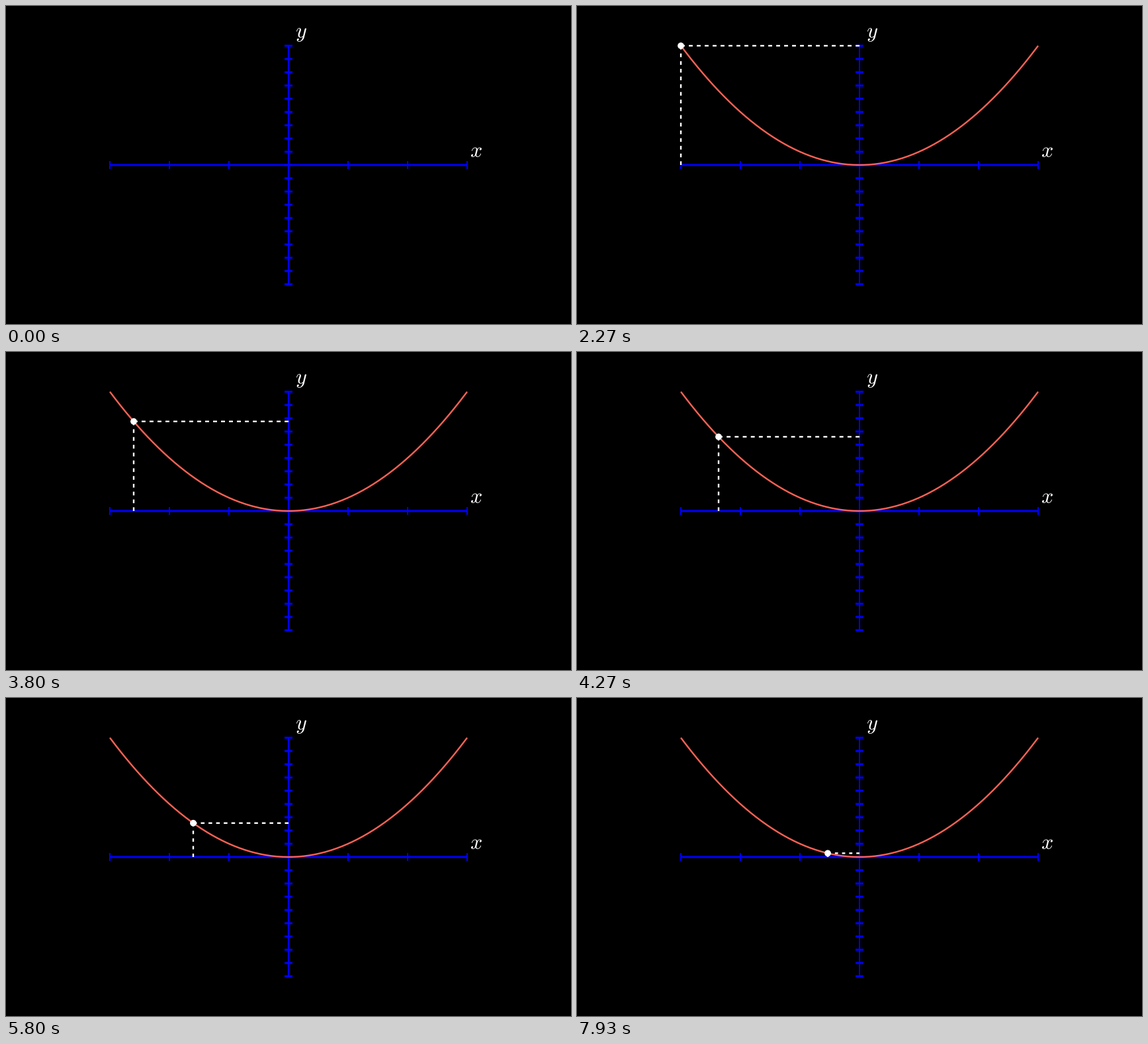
Write a matplotlib script that moves like this. It is 854 px wide and 480 px high and loops after 8000 ms.

```python
import math

import matplotlib.pyplot as plt
import numpy as np
from matplotlib.animation import FuncAnimation
from matplotlib.collections import LineCollection
from matplotlib.patches import Circle, PathPatch
from matplotlib.textpath import TextPath
from matplotlib.transforms import Affine2D

W, H, DPI = 854, 480, 64
FRAMES, TICK_MS = 400, 20
STEP_MS = 1000 / 15        # the motion advances 15 times per second
LEAD_MS = 14               # rounds a step's start to the nearest drawn frame
OX, OY = 427, 240          # origin in pixels
UX, UY = 90, 20            # pixels per unit on each axis
BLUE, RED, WHITE = "#0000ff", "#fc6255", "#ffffff"
DASH_PERIOD = 12

plt.rcParams["mathtext.fontset"] = "cm"
plt.rcParams["toolbar"] = "None"

fig = plt.figure(figsize=(W / DPI, H / DPI), dpi=DPI, facecolor="black")
ax = fig.add_axes([0, 0, 1, 1])
ax.set_xlim(0, W)
ax.set_ylim(H, 0)
ax.axis("off")


def pt(px):
    return px * 72 / DPI


def to_px(x):
    """Pixel position of the parabola at x."""
    return OX + UX * x, OY - UY * x * x


def add_lines(segments, color, width, z):
    lines = LineCollection(segments, colors=color, linewidths=pt(width),
                           capstyle="butt", zorder=z)
    lines.set_snap(False)
    return ax.add_collection(lines, autolim=False)


def add_label(name, left, bottom, size=32.1):
    path = TextPath((0, 0), f"${name}$", size=size)
    box = path.get_extents()
    move = Affine2D().translate(-box.x0, -box.y0).scale(1, -1).translate(left, bottom)
    ax.add_patch(PathPatch(move.transform_path(path), fc=WHITE, lw=0, zorder=2))


def dashes(start, end):
    """Even dashes that begin and end exactly on both end points."""
    a, b = np.array(start, float), np.array(end, float)
    n = max(2, math.ceil(np.linalg.norm(b - a) / DASH_PERIOD + 1e-6))
    on, off = 0.5 / n, 0.5 / (n - 1)
    cuts = [k * (on + off) for k in range(n)]
    return [(a + (b - a) * c, a + (b - a) * (c + on)) for c in cuts]


def smooth(t, k=10):
    def sig(v):
        return 1 / (1 + math.exp(-v))
    err = sig(-k / 2)
    return min(max((sig(k * (t - 0.5)) - err) / (1 - 2 * err), 0), 1)


# Axes with ticks
x_ticks = [OX + UX * k for k in range(-3, 4)]
y_ticks = [OY + UY * k for k in range(-9, 10)]
flat = [[(156, OY), (698, OY)]] + [[(OX - 6, y), (OX + 6, y)] for y in y_ticks]
upright = [[(OX, 59), (OX, 421)]] + [[(x, OY - 6), (x, OY + 6)] for x in x_ticks]
add_lines(flat, BLUE, 3, 1)
add_lines(upright, BLUE, 2, 1)
add_label("x", 703, 228)
add_label("y", 439, 54)

# Moving parts
curve, = ax.plot([], [], color=RED, lw=pt(2.4), solid_capstyle="butt",
                 solid_joinstyle="round", zorder=3)
guides = add_lines([], WHITE, 2.4, 4)
dot = ax.add_patch(Circle((0, 0), 4.9, fc=WHITE, lw=0, zorder=5))


def draw(i):
    step = int((i * TICK_MS + LEAD_MS) / STEP_MS)
    t = step * STEP_MS / 1000
    grown = smooth(min(t, 1))
    curve.set_data(*to_px(np.linspace(-3, -3 + 6 * grown, 200)))
    curve.set_visible(grown > 0)

    shown = step >= 30
    dot.set_visible(shown)
    guides.set_visible(shown)
    if shown:
        px, py = to_px(-3 + 0.5 * max(t - 3, 0))
        dot.center = px, py
        guides.set_segments(dashes((px, py), (OX, py)) + dashes((px, py), (px, OY)))
    return curve, guides, dot


anim = FuncAnimation(fig, draw, frames=FRAMES, interval=TICK_MS,
                     init_func=lambda: draw(0), repeat=True, repeat_delay=0)
plt.show()
```
